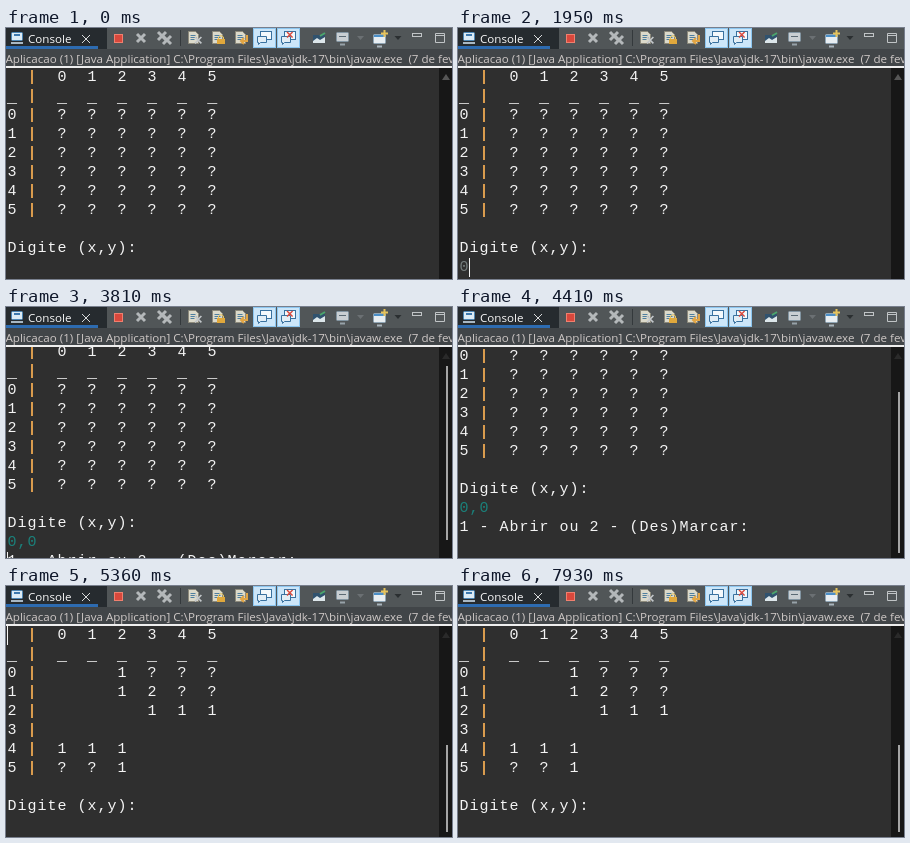
Animation, 446 px wide and 251 px high, one loop 8 s. Source, as an HTML page:

```html
<!DOCTYPE html>
<html lang="pt">
<head>
<meta charset="utf-8">
<title>Console</title>
<style>
html, body { margin: 0; width: 100%; height: 100%; overflow: hidden; background: #2f2f2f; }
#stage { position: absolute; left: 0; top: 0; width: 446px; height: 251px; overflow: hidden; background: #2f2f2f; }
svg { position: absolute; left: 0; top: 0; }
svg text { font: 11.6px "Open Sans", "Noto Sans", sans-serif; white-space: pre; }
#view { position: absolute; left: 0; top: 40px; width: 446px; height: 211px; overflow: hidden; }
#log { position: absolute; left: 1.5px; top: 0; margin: 0; color: #f4f4f4;
  font: 15px/19px "Liberation Mono", "Courier New", monospace; letter-spacing: 1px; }
#log b { color: #e0a050; }
#log u { position: relative; top: 2px; left: -.5px; text-decoration: none; font-size: 16.67px; line-height: 0; letter-spacing: 0; }
#log .in { color: #179c84; }
#log .dim { color: #747c7c; }
#log.sent .in { color: #1b807a; }
#caret { position: absolute; width: 1px; height: 19px; background: #f4f4f4; }
#track { position: absolute; left: 433px; top: 0; width: 13px; height: 211px; background: #171717; }
#arrow { position: absolute; left: 3px; top: 6px; border: 4.5px solid transparent; border-top: 0; border-bottom: 6px solid #555; }
#thumb { position: absolute; left: 440px; width: 2px; background: #a4a4a4; }
</style>
</head>
<body>
<div id="stage">
  <div id="view">
    <pre id="log"></pre>
    <div id="caret"></div>
    <div id="track"><div id="arrow"></div></div>
    <div id="thumb"></div>
  </div>
  <svg width="446" height="251" viewBox="0 0 446 251">
    <defs>
      <g id="page"><path d="M.5 .5h7l3 3v9H.5z" fill="#dcdacb" stroke="#8d8a7c"/><path d="M2.500 4.500h5M2.500 6.500h6M2.500 8.500h4" stroke="#4f7f9f"/></g>
      <g id="screen"><rect x=".5" y=".5" width="12" height="9" rx="1" fill="#e8eef2" stroke="#8fa5b5"/><path d="M4 12.500h5" stroke="#a9b5bd" stroke-width="2"/></g>
      <g id="chat" stroke="#39719f"><rect x="3.500" y=".5" width="11" height="8" fill="#f4f9fc"/><path d="M.500 5.500h9v6h-6l-2 2v-2h-1z" fill="#e2eef6"/></g>
      <path id="cross" d="M0 0l8 8M8 0l-8 8" fill="none"/>
      <path id="down" d="M0 0h7l-3.500 4z"/>
    </defs>
    <rect width="446" height="21" fill="#262b2f"/>
    <rect x="101" width="345" height="21" fill="#515658"/>
    <rect y="18" width="92" height="3" fill="#2d6bb0"/>
    <rect y="21" width="446" height="17" fill="#414548"/>
    <rect y="38" width="446" height="2" fill="#eeeeee"/>

    <rect x="5.500" y="4.500" width="11" height="8" rx="1" fill="#dcebf5" stroke="#4d86b5"/>
    <path d="M8 7h6" stroke="#3d78ad" stroke-width="2"/>
    <path d="M5 15h12" stroke="#a9b8c4" stroke-width="2"/>
    <text x="22" y="15" fill="#f8f8f8">Console</text>
    <use href="#cross" x="76" y="7" stroke="#d8dadb"/>

    <rect x="108.500" y="6.500" width="8" height="8" fill="#d9483c" stroke="#f0806f"/>
    <g stroke="#b4b8ba" stroke-width="3">
      <use href="#cross" x="131" y="6"/>
      <use href="#cross" x="152" y="4"/>
      <use href="#cross" x="157" y="9" transform="translate(0 -1)"/>
    </g>
    <path d="M174.500 2v16" stroke="#34393c"/>

    <use href="#page" x="182" y="3"/>
    <use href="#cross" transform="translate(189 9) scale(.8)" stroke="#c4c8cb" stroke-width="2"/>
    <use href="#page" x="206" y="3"/>
    <path d="M212.500 11v-2q2.500-3 5 0v2" fill="none" stroke="#e6c35c"/>
    <rect x="211" y="11" width="8" height="5" fill="#e0a83c"/>
    <use href="#page" x="229" y="3"/>
    <path d="M236 13h5V7M238 10l-3 3 3 3" fill="none" stroke="#e2a544" stroke-width="2"/>

    <g fill="#cce6f9" stroke="#8cc6f0"><rect x="247.500" y=".5" width="22" height="19"/><rect x="271.500" y=".5" width="22" height="19"/></g>
    <use href="#chat" x="251" y="3"/>
    <use href="#chat" x="275" y="3"/>
    <use href="#cross" transform="translate(281 4) scale(.7)" stroke="#d9483c" stroke-width="2"/>

    <path d="M307 7h12v8h-12z" fill="#30526e"/>
    <path d="M307 13l4-3 3 2 5-3v6h-12z" fill="#dce6ea"/>
    <path d="M314 8l5-3" stroke="#4ba66e" stroke-width="2"/>
    <g opacity=".8"><use href="#screen" x="330" y="4"/></g>
    <path d="M333 8.500h7" stroke="#5b6a74"/>
    <use href="#down" x="351" y="8" fill="#6b7073"/>
    <use href="#screen" x="367" y="6"/>
    <path d="M368 8h10" stroke="#4b8fc8" stroke-width="2"/>
    <path d="M378.500 2v7M375 5.500h7" stroke="#e6c35c" stroke-width="2"/>
    <use href="#down" x="388.500" y="8" fill="#2b2f31"/>
    <rect x="406.500" y="5.500" width="9" height="3" fill="none" stroke="#c0c4c6"/>
    <path d="M429.500 5.500h9v9h-9zM429.500 7.500h9" fill="none" stroke="#c0c4c6"/>

    <text x="-.5" y="35" fill="#cfc9c7">Aplicacao (1) [Java Application] C:\Program Files\Java\jdk-17\bin\javaw.exe  (7 de fev de 2022</text>

    <g id="mouse" fill="none">
      <path d="M.5 1.500h2l1 1 1-1h2M3.500 2v12M.5 14.500h2l1-1 1 1h2" stroke="#f2f2f2" stroke-width="2.400"/>
      <path d="M1 1.500h1.500l1 1 1-1H6M3.500 2v12M1 14.500h1.500l1-1 1 1H6" stroke="#222" stroke-width=".8"/>
    </g>
  </svg>
</div>
<script>
const LOOP = 8000, ROW = 19, COL = 10, PAGE = 209, TRACK = 190;
const $ = id => document.getElementById(id);

// Each board row is six cells.
const board = rows => [
  '  |  ' + [...'012345'].join('  '),
  '_ |  ' + [...'______'].join('  '),
  ...rows.map((r, i) => i + ' |  ' + [...r].join('  ')),
  '', 'Digite (x,y): '
].join('\n').replace(/\|/g, '<b>|</b>').replace(/_/g, '<u>_</u>');

const part = (from, text, cls = '') => `<span data-from="${from}" class="${cls}">${text}</span>`;

$('log').innerHTML = board(Array(6).fill('??????')) + '\n' +
  part(1950, '0', 'dim') + part(2480, ',', 'in') + part(3280, '0', 'in') + '\n' +
  part(3810, '1 - Abrir ou 2 - (Des)Marcar: ') + '\n' +
  part(5010, '1', 'in') + '\n' +
  part(5310, board(['  1???', '  12??', '   111', '      ', '111   ', '??1   ']));
const parts = [...document.querySelectorAll('[data-from]')];

// [time, scroll offset, rows in the log]
const scrolls = [[0, 0, 11], [3810, 4, 12], [3880, 38, 13], [5220, 42, 14], [5310, 247, 24]];

// [time, column, row]; no column means the caret is off
const carets = [
  [0], [751, 14, 9], [1290], [1820, 14, 9], [1950, 1, 10], [2480, 2, 10], [3010], [3280, 3, 10],
  [3810, 0, 11], [4410], [4890, 0, 11], [5010, 1, 12], [5220, 0, 13], [5310],
  [5360, 0, 13], [5880], [6410, 0, 13], [6940], [7400, 0, 13], [7930]
];

// [step, x, y] of the pointer
const path = [[0, 354, 240], [3, 235, 232], [6, 146, 224], [7, 136, 221], [9, 146, 219]];

const last = (list, t) => list.filter(e => e[0] <= t).pop();

function pointer(t) {
  const k = Math.min(9, Math.floor((t - 200) / 68.8));
  const i = Math.max(1, path.findIndex(p => p[0] >= k));
  const [a, b] = [path[i - 1], path[i]];
  const f = (k - a[0]) / (b[0] - a[0]);
  return [1, 2].map(n => Math.round(a[n] + (b[n] - a[n]) * f));
}

function draw(t) {
  const [, top, rows] = last(scrolls, t);
  const [, col, row] = last(carets, t);
  const sent = t >= 3810;
  $('log').style.top = -top + 'px';
  $('log').className = sent ? 'sent' : '';
  for (const p of parts) p.style.visibility = t >= p.dataset.from ? 'visible' : 'hidden';
  parts[0].className = sent ? 'in' : 'dim';

  const caret = $('caret').style;
  caret.display = col === undefined ? 'none' : 'block';
  if (col !== undefined) {
    caret.left = 1 + col * COL + 'px';
    caret.top = row * ROW - top + 'px';
  }

  const total = rows * ROW, thumb = $('thumb').style;
  thumb.display = sent ? 'block' : 'none';
  thumb.top = 16 + TRACK * top / total + 'px';
  thumb.height = TRACK * PAGE / total + 'px';
  $('arrow').style.opacity = sent ? .3 : 1;

  const seen = t >= 200 && t < 1950;
  $('mouse').style.display = seen ? '' : 'none';
  if (seen) $('mouse').setAttribute('transform', `translate(${pointer(t)})`);
}

const start = performance.now();
function tick() {
  draw((performance.now() - start) % LOOP);
  requestAnimationFrame(tick);
}
draw(0);
requestAnimationFrame(tick);
</script>
</body>
</html>
```
